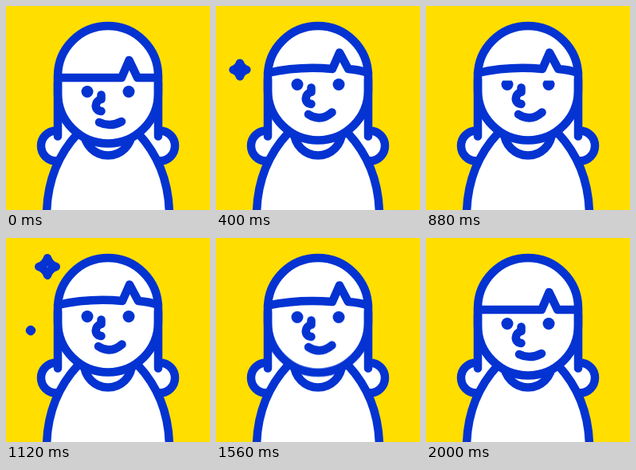
An HTML page that plays this animation: 256 px wide and 256 px high, repeating every 4 s.

```html
<!DOCTYPE html>
<html lang="en">
<head>
<meta charset="utf-8">
<title>Sparkling girl</title>
<style>
  @property --grow { syntax: "<number>"; inherits: false; initial-value: 0; }

  html, body { margin: 0; width: 100%; height: 100%; overflow: hidden; background: #ffde00; }
  svg { display: block; width: 256px; height: 256px; }
  .line { fill: #fff; stroke: #0433d2; stroke-width: 10.5; stroke-linecap: round; stroke-linejoin: round; }
  .open { fill: none; }
  .eye { fill: #0433d2; }
  .white { fill: #fff; }

  .features, .chin, .fringe, .mouth, .lids, .star { animation: 4s infinite; }

  /* The head looks up, holds, then settles back. */
  .features { animation-name: look; }
  .chin { animation-name: chin; }
  .fringe { animation-name: fringe; }
  .mouth { animation-name: smile; }
  .features, .chin, .fringe, .mouth { animation-timing-function: ease-in-out; }
  @keyframes look {
    0%, 50%, 100% { transform: translateY(0); }
    10%, 36% { transform: translateY(-9px); }
  }
  @keyframes chin {
    0%, 50%, 100% { transform: translateY(0); }
    10%, 36% { transform: translateY(-4px); }
  }
  @keyframes fringe {
    0%, 50%, 100% { d: path("M65 90 Q105 90 145 90 L154.500 68 L165 90 Q178 90 191 90"); }
    10%, 36% { d: path("M65 84 Q105 75 146 79 L155 58.500 L166 79 Q180 80 191 84"); }
  }
  @keyframes smile {
    0%, 50%, 100% { d: path("M117 146 Q131 152.500 145 145"); }
    10%, 36% { d: path("M116 145 Q131 155 145.500 142.500"); }
  }

  .lids { animation-name: blink; animation-timing-function: linear; }
  @keyframes blink {
    0%, 15%, 23%, 100% { transform: translateY(0); }
    17% { transform: translateY(6.5px); }
    18.5%, 20% { transform: translateY(11px); }
  }

  /* Stars keep their line weight while their shape grows and shrinks. */
  .star {
    vector-effect: non-scaling-stroke;
    transform: scale(calc(var(--grow) * var(--size)));
    animation-name: twinkle;
    animation-delay: var(--start);
    animation-fill-mode: backwards;
  }
  @keyframes twinkle {
    0% { --grow: 0; animation-timing-function: cubic-bezier(.39, .575, .565, 1); }
    2.7% { --grow: 1; animation-timing-function: cubic-bezier(.47, 0, .745, .715); }
    5.4%, 100% { --grow: 0; }
  }
</style>
</head>
<body>
<svg viewBox="0 0 256 256">
  <g class="line">
    <circle cx="63" cy="175.500" r="19"/>
    <circle cx="193" cy="175.500" r="19"/>
  </g>
  <path class="white" d="M65 172 V88 A63 63 0 0 1 191 88 V172 Z"/>
  <g class="line">
    <path d="M51 264 C51 222 65 187 90 160 H166 C191 187 205 222 205 264 Z"/>
    <circle cx="128" cy="157.500" r="30"/>
    <path class="chin" d="M65 96 V109.500 A63 63 0 0 0 191 109.500 V96"/>
    <path class="open" d="M65 163.500 V88 A63 63 0 0 1 191 88 V163.500"/>
  </g>

  <g class="features">
    <circle class="eye" cx="102" cy="107.500" r="7.500"/>
    <circle class="eye" cx="154" cy="107.500" r="7.500"/>
    <g class="lids white">
      <rect x="92" y="87" width="20" height="12"/>
      <rect x="144" y="87" width="20" height="12"/>
    </g>
    <path class="line open" d="M119.500 111.500 V117 C111 119 110 131 119.500 132"/>
    <path class="line open mouth" d="M117 146 Q131 152.500 145 145"/>
  </g>
  <path class="line open fringe" d="M65 90 Q105 90 145 90 L154.500 68 L165 90 Q178 90 191 90"/>

  <g id="stars"></g>
</svg>
<script>
  // x, y, start in ms, relative size
  const stars = [
    [30, 80, 368, 1],
    [217, 37, 524, 1],
    [227, 125, 648, 1],
    [31, 116, 911, 0.85],
    [52, 36, 950, 1],
    [225, 100, 1219, 0.84]
  ];
  const outline = "M0 -17.8 Q4.3 -4.3 17.8 0 Q4.3 4.3 0 17.8 Q-4.3 4.3 -17.8 0 Q-4.3 -4.3 0 -17.8 Z";

  document.getElementById("stars").innerHTML = stars.map(([x, y, start, size]) =>
    `<g transform="translate(${x} ${y})">
      <path class="line star" d="${outline}" style="--start:${start}ms;--size:${size}"/>
    </g>`).join("");
</script>
</body>
</html>
```
